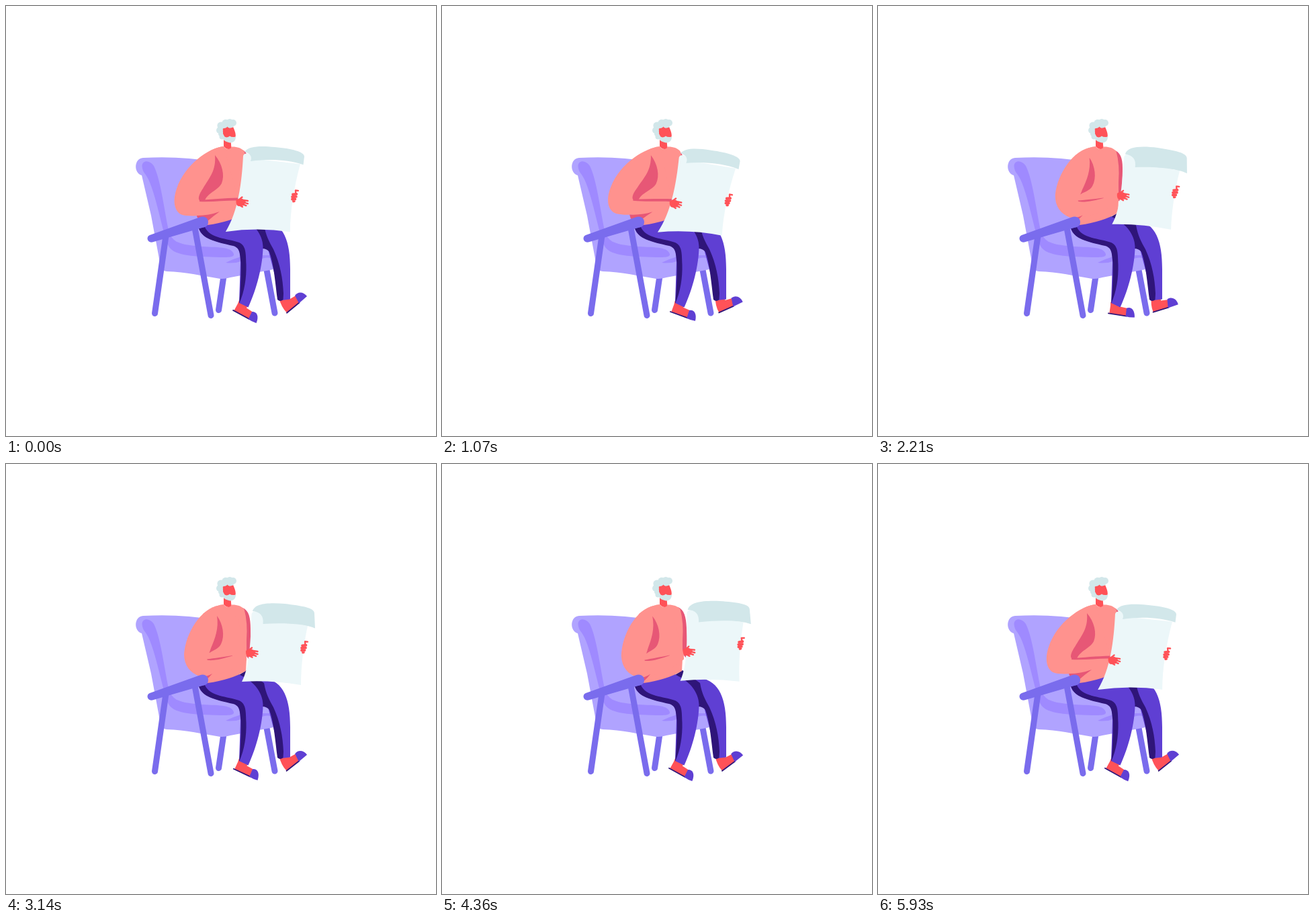
Recreate the animation shown at these times as an HTML page with a canvas. Size 640 px wide and 640 px high, loop 6000 ms.

```html
<!DOCTYPE html>
<html lang="en">
<head>
<meta charset="utf-8">
<title>Reading in an armchair</title>
<style>
html, body { margin: 0; width: 100%; height: 100%; overflow: hidden; background: #fff; }
canvas { display: block; width: 640px; height: 640px; }
</style>
</head>
<body>
<canvas id="stage" width="640" height="640"></canvas>
<script>
const ctx = document.getElementById('stage').getContext('2d');
const LOOP = 6000, RAD = Math.PI / 180;
const C = {
  chair: '#b0a3ff', seam: '#9f8aff', wood: '#7a6ced',
  pants: '#5f3fd3', dark: '#2f1579', skin: '#ff5258',
  wool: '#ff928e', fold: '#e75776', hair: '#d2e7ea', sheet: '#ecf7f9'
};

const lerp = (a, b, k) => a + (b - a) * k;
const smooth = k => k * k * (3 - 2 * k);
const step = (a, b, t) => smooth(Math.min(1, Math.max(0, (t - a) / (b - a))));

function fill(color, d) {
  ctx.fillStyle = color;
  ctx.fill(new Path2D(d));
}

function line(color, width, d) {
  ctx.strokeStyle = color;
  ctx.lineWidth = width;
  ctx.lineCap = ctx.lineJoin = 'round';
  ctx.stroke(new Path2D(d));
}

function dots(color, list) {
  ctx.fillStyle = color;
  for (const [x, y, r] of list) {
    ctx.beginPath();
    ctx.arc(x, y, r, 0, 7);
    ctx.fill();
  }
}

// Blend two paths that share the same commands
function blend(a, b, k) {
  const nums = b.match(/-?[\d.]+/g);
  let i = 0;
  return a.replace(/-?[\d.]+/g, n => lerp(+n, +nums[i++], k).toFixed(2));
}

function turned(x, y, deg, draw) {
  ctx.save();
  ctx.translate(x, y);
  ctx.rotate(deg * RAD);
  ctx.translate(-x, -y);
  draw();
  ctx.restore();
}

function shifted(x, y, draw) {
  ctx.save();
  ctx.translate(x, y);
  draw();
  ctx.restore();
}

// Tilt of arms and paper: slow drift, quick swings between the two sides
const tilts = [
  [-790, -2.1], [1070, 3], [1290, 0], [1470, -6], [1950, 2.5],
  [4360, -2.6], [4450, -6], [4690, 3], [5150, -2.2], [7070, 3]
];
function tiltAt(t) {
  const i = tilts.findIndex(k => k[0] > t);
  const [t0, a] = tilts[i - 1], [t1, b] = tilts[i];
  const k = (t - t0) / (t1 - t0);
  return lerp(a, b, t1 - t0 > 1000 ? k : smooth(k));
}

const sideAt = t => step(1130, 1500, t) - step(4370, 4590, t);

function drawChair() {
  line(C.wood, 9, 'M324 402L316.5 452.5M388 393L400 457');
  fill(C.chair, 'M204 226C190 227 190 249 202 252L216 312L230 387Q232 394 239 395C268 396 294 402 316 405.5Q324 407 334 404L398 392L395 362L330 330L310 232Q262 223 204 226Z');
  fill(C.seam, 'M202.5 238C203 229 214 229 220 238C230 258 235 300 242 334C247 350 254 354 282 357C310 360 332 357 338 367C342 374 334 374 318 374C282 373 252 372 243 359C234 344 226 290 212.5 259C208 249 203 248 202.5 238Z');
  fill(C.seam, 'M327 382Q339 376 353 372L353 379Q340 384 327 382ZM376 378Q386 373 394 375L392 371L376 371Z');
}

function drawArmrest() {
  line(C.wood, 9, 'M238 342L221.5 457.5M281 330L305 460.5');
  fill(C.wood, 'M214 341L288 314.5C297 311 303 318 300.5 325Q299 329 292 330L218 351.5C210 353 208 343 214 341Z');
}

function drawFeet(t) {
  const wave = p => Math.cos(2 * Math.PI * (t / 1500 - p));
  turned(353.5, 441.5, 10.5 * wave(0.945) - 10, () => {
    fill(C.skin, 'M347 438L360 445L358 449.5L366.5 455L361.5 466L339.5 453L345 443Z');
    line(C.dark, 1.8, 'M338 452.8L362 466');
    fill(C.pants, 'M366 455C373 454.5 377 461 372.5 472Q366 470 360.5 466Z');
  });
  turned(416.5, 435, 11.5 - 11.5 * wave(0.02), () => {
    fill(C.skin, 'M406 434L420 432L422 436.5L430.5 431.5L437 441L418 456.5Q410 449 406 434Z');
    line(C.dark, 1.8, 'M418 456.7L436.5 441.5');
    fill(C.pants, 'M430 431C434 424.5 443 425 448 432L436 442.5Z');
  });
}

function drawLegs() {
  fill(C.pants, 'M350 314L384 318C414 324 423 350 423 392L423 436.5L410 438L390 362Z');
  fill(C.dark, 'M345 315L358 307L384 326C387 343 392 351 398 362C408 384 412 405 413 428L412.5 437Q408 441 404 437C401 415 399 385 392 366Q388 361 381 361L360 330Z');
  fill(C.pants, 'M287 331C292 346 312 351 338 356C347 358 349 366 349 380L347 442L360.5 448.5C373 422 382.5 385 382.5 358C382 340 369 324 352 316L345 312L300 322Z');
  fill(C.dark, 'M287 331C292 347 312 351 338 357C348 360 348 367 349.5 382C350 405 349 425 347 443C355 425 358 405 357.5 385C357 366 357 357 347 352C330 346 303 346 296 329Z');
}

function drawHead() {
  fill(C.skin, 'M324 192L334.5 200L335.5 212Q329 215 324 209Z');
  fill(C.skin, 'M321 179L337.5 179C340.5 185 342.5 191 341.5 195L334 200L323 196Z');
  dots(C.hair, [[320, 178, 5.6], [327, 174.5, 5.8], [333, 173.5, 5.6], [338, 174, 5],
    [334, 176.5, 5.4], [325, 177, 5], [318, 185, 5], [320, 190, 4], [321.5, 194.5, 4]]);
  fill(C.skin, 'M323 183Q330 183 337 181L340 188L340.5 195L326 196L323 190Z');
  fill(C.hair, 'M320 189C323 190 324 195 328 195.5Q331 195.5 333 193.5Q336 196 342 194.5C342 200 339 204 333 203.5C326 202 321 199 320 189Z');
}

function drawTorso() {
  fill(C.wool, 'M324 209C312 210 302 216 293 223L284 260L284 312L300 326Q335 321 357 308L358 290L358 262Q360 236 354.5 216C350 211 343 209 335 209.5Q335 213 332 213Q326 213 324 209Z');
}

function drawFarSleeve(s) {
  fill(C.fold, blend(
    'M350 214C356 215 359 219 358 224L352 275L346 270C346 250 346 232 350 214Z',
    'M352 214C362 218 364 230 364 245L364 272L361 290L348 275C348 250 348 232 352 214Z', s));
}

function drawArm(s) {
  fill(C.wool, blend(
    'M324 209C302 211 266 236 254 272C247 292 251 311 268 312C288 314 318 310 344 296L345 285L330 230Z',
    'M318 210.5C290 214 267 252 265 283C265 300 274 311 288 316C305 318 335 310 358 292L358 283L345 230Z', s));
  fill(C.fold, blend(
    'M311 222C322 235 326 252 321 264C316 274 299 279 296 290L290 290C284 289 288 279 293 272C303 255 313 245 311 222Z',
    'M314 226C323 238 326 256 320 268C316 276 308 277 303 281L302.5 281C303 280 304 277 305 274C311 260 317 245 314 226Z', s));
  fill(C.fold, blend(
    'M288 289C305 288 325 286 346 285.5L346 289.5C328 289 308 292 288 291Z',
    'M299 290.5C310 289 325 287 337 285L337 285.5C325 289 312 293 300 292Z', s));
  fill(C.fold, blend(
    'M284 312Q302 312 318 306Q308 313 298 322L286 318Z',
    'M288 317Q299 317 307 312Q303 317 298 321L290 320Z', s));
}

function drawPaper(s) {
  fill(C.sheet, blend(
    'M353 223C351 262 346 305 327 336Q375 329 423 336C423 305 429 268 438 235L366 227C365 219 355 217 353 223Z',
    'M365.5 223C364 255 364 300 351 324Q395 321.5 439 329C439 300 443 268 449 241L384 230C382 219 368 216 365.5 223Z', s));
  fill(C.hair, blend(
    'M355 217C361 208 380 208 400 210C425 212 444 217 444 224L442.5 236C420 229 395 227 364 231C367 224 363 219 355 217Z',
    'M367 219C370 207 392 206 415 208C440 211 459 214 459 222L460 244.5C445 238 415 236 382.5 238C384 226 378 220 367 219Z', s));
}

function drawHands(s) {
  shifted(14.5 * s, -11 * s, () => {
    fill(C.skin, 'M342.5 289Q347 285 352 287L357 291L354 297L347 298Q342 298 342.5 289Z');
    line(C.skin, 2.4, 'M346 289L351.5 284.5M350 288.5L360 290M351 291.5L360 294M350 294L357.5 297M347 296L352 298.8');
  });
  shifted(14 * s, -10 * s, () => {
    line(C.skin, 2.4, 'M431 274.3L435 274.7M431 275L431.5 280');
    line(C.skin, 3.7, 'M427 280.3L432.5 279.7M426 284L432 283.6M426 287.5L430.5 287.2M428 290.4L429 290.2');
  });
}

function frame(now) {
  const t = now % LOOP, s = sideAt(t), tilt = tiltAt(t);
  const swing = draw => turned(lerp(310, 325, s), lerp(220, 245, s), tilt, () => draw(s));
  ctx.fillStyle = '#fff';
  ctx.fillRect(0, 0, 640, 640);
  drawChair();
  drawFeet(t);
  drawLegs();
  drawHead();
  swing(drawFarSleeve);
  drawTorso();
  swing(drawArm);
  drawArmrest();
  swing(drawPaper);
  swing(drawHands);
}

const start = performance.now();
function tick() {
  frame(performance.now() - start);
  requestAnimationFrame(tick);
}
tick();
</script>
</body>
</html>
```
